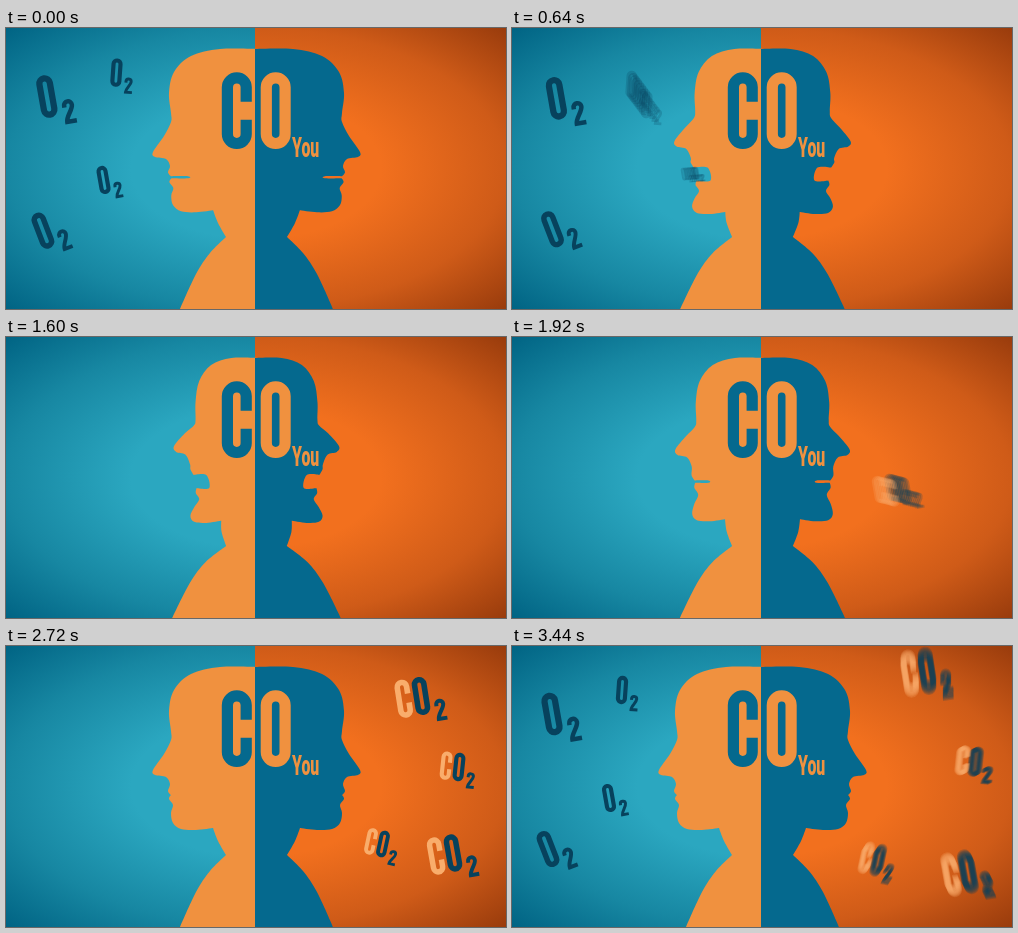
Recreate the animation shown at these times as an HTML page with a canvas. Size 500 px wide and 281 px high, loop 3520 ms.

```html
<!DOCTYPE html>
<html lang="en">
<head>
<meta charset="utf-8">
<title>CO You</title>
<style>
html, body { margin: 0; width: 100%; height: 100%; overflow: hidden; background: #0a7398; }
canvas { display: block; width: 100vw; height: 100vh; }
</style>
</head>
<body>
<canvas id="stage" width="500" height="281" role="img" aria-label="Two heads breathe in O2 and breathe out CO2"></canvas>
<script>
const LOOP = 3520, STEP = 80, SPLIT = 249, MIDDLE = 252;
const ORANGE = '#f0913f', BLUE = '#05698e', DARK = '#07425d', PEACH = '#f9ad6c';
const ctx = document.getElementById('stage').getContext('2d');
const clamp = (v, lo = 0, hi = 1) => Math.max(lo, Math.min(hi, v));
const mix = (a, b, k) => a + (b - a) * k;

// Smooth rise from 0 to 1 that starts at the given time.
function ramp(t, start, length) {
  const k = clamp((t - start) / length);
  return k * k * (3 - 2 * k);
}

// Resting profile from crown to shoulder; the mouth is a slit of no height.
const profile = '252,21 214,21 185,28 168,44 163,65 165,85 165,94 158,108 147,124 149,129 160,131 164,138 162,145 165,149 182,149 182,149 165,149 163,153 167,159 165,167 167,177 175,183 190,184 207,182 212,195 220,209 204,225 190,246 174,281'
  .split(' ').map(p => p.split(',').map(Number));
const corners = new Set([0, 13, 16, 23, 25, 28]);
const LIP = 12, JAW = 15, NECK = 24;

// Tilting back narrows the head and lifts the nose; opening parts the lips.
function bend(tilt, open) {
  return profile.map(([x, y], i) => {
    const nose = Math.exp(-(((y - 122) / 28) ** 2));
    const narrow = clamp((210 - y) * 0.006, -0.1, 0.3) - 0.1 * nose;
    let nx = MIDDLE - (MIDDLE - x) * (1 - narrow * tilt);
    let ny = y - 15 * nose * tilt;
    if (i >= LIP && i < JAW) ny -= 5 * open;
    if (i >= JAW && i < NECK) {
      const drop = clamp((185 - y) / 35, 0.25, 1) * open;
      nx += 3 * drop;
      ny += 8 * drop;
    }
    return [nx, ny];
  });
}

function head(pts, color, flip) {
  const tangent = i => corners.has(i) ? [0, 0]
    : [0, 1].map(j => (pts[i + 1][j] - pts[i - 1][j]) / 6);
  ctx.save();
  if (flip) {
    ctx.translate(501, 0);
    ctx.scale(-1, 1);
  }
  ctx.fillStyle = color;
  ctx.beginPath();
  ctx.moveTo(...pts[0]);
  for (let i = 1; i < pts.length; i++) {
    const [a, b] = [pts[i - 1], pts[i]];
    const [u, v] = [tangent(i - 1), tangent(i)];
    ctx.bezierCurveTo(a[0] + u[0], a[1] + u[1], b[0] - v[0], b[1] - v[1], ...b);
  }
  ctx.lineTo(MIDDLE, 281);
  ctx.fill();
  ctx.restore();
}

// One half of the wall, shaded towards the corners of the whole stage.
function wall(x, w, light, middle, dark) {
  ctx.save();
  ctx.beginPath();
  ctx.rect(x, 0, w, 281);
  ctx.clip();
  ctx.translate(250, 140.5);
  ctx.scale(250, 140.5);
  const g = ctx.createRadialGradient(0, 0, 0.5, 0, 0, 1.42);
  g.addColorStop(0, light);
  g.addColorStop(0.54, middle);
  g.addColorStop(1, dark);
  ctx.fillStyle = g;
  ctx.fillRect(-1, -1, 2, 2);
  ctx.restore();
}

// Narrow poster letters, 15 by 38 units around their centre.
const shapes = {
  O: new Path2D('M-4.7-11.7A4.7 4.7 0 0 1 4.7-11.7V11.7A4.7 4.7 0 0 1-4.7 11.7Z'),
  C: new Path2D('M4.7-4.5V-11.7A4.7 4.7 0 0 0-4.7-11.7V11.7A4.7 4.7 0 0 0 4.7 11.7V4.5'),
  2: new Path2D('M-3.5-4V-5.5A3.5 3.5 0 0 1 3.5-5.5C3.5-1-3.2 4-3.2 9H5.5')
};

function letter(name, x, y, scale, color, weight = 5.6) {
  ctx.save();
  ctx.translate(x, y);
  ctx.scale(scale, scale);
  ctx.strokeStyle = color;
  ctx.lineWidth = weight;
  ctx.stroke(shapes[name]);
  ctx.restore();
}

function molecule([x, y], size, turn, carbon) {
  ctx.save();
  ctx.translate(x, y);
  ctx.rotate(turn * Math.PI / 180);
  ctx.scale(size, size);
  if (carbon) letter('C', -17.5, 0, 1, PEACH);
  letter('O', 0, 0, 1, DARK);
  letter('2', 17.2, 16.5, 1, DARK, 4);
  ctx.restore();
}

// Draws a molecule, smeared along its way when it moves fast.
function smear(place, t, size, turn, carbon) {
  const [x0, y0] = place(t - 16), [x1, y1] = place(t + 16);
  if (Math.hypot(x1 - x0, y1 - y0) < 3) {
    molecule(place(t), size, turn, carbon);
    return;
  }
  ctx.globalAlpha = 0.22;
  for (let d = -16; d <= 16; d += 4) molecule(place(t + d), size, turn, carbon);
  ctx.globalAlpha = 1;
}

// Both lists are in the order of breathing.
const inhaled = [
  { x: 97, y: 152, size: 0.74, turn: -10 },
  { x: 110, y: 44, size: 0.74, turn: 4 },
  { x: 40, y: 68, size: 1.12, turn: -10 },
  { x: 36, y: 203, size: 0.98, turn: -21 }
];
const exhaled = [
  { x: 447, y: 207, size: 0.98, turn: -10 },
  { x: 415, y: 50, size: 1, turn: -9 },
  { x: 453, y: 121, size: 0.74, turn: 6 },
  { x: 377, y: 198, size: 0.7, turn: 12 }
];

// Drifts in from outside, hovers, then is drawn into the left mouth.
function inhale({ x, y, size, turn }, i, t) {
  const enter = 2760 + 60 * i, end = 4190 + 100 * i;
  if (t < enter || t >= end) return;
  const place = time => {
    const hover = 1.5 * (ramp(time, enter, 300) - 1) + 0.03 * clamp((time - 3440) / 400);
    const k = mix(hover, 1, ramp(time, end - 180, 180));
    return [mix(x, 186, k), mix(y, 145, k)];
  };
  smear(place, t, size * mix(1, 0.4, ramp(t, end - 160, 160)), turn, false);
}

// Blown out of the right mouth, hovers, then scatters away from the hub.
function exhale({ x, y, size, turn }, i, t) {
  const start = 1840 + 120 * i;
  if (t < start) return;
  const place = time => {
    const across = 1 - (1 - clamp((time - start) / 350)) ** 2;
    const away = 0.28 * Math.max(0, time - 3360) / STEP;
    return [mix(345, x, across) + (x - 415) * away,
      mix(147, y, ramp(time, start, 450)) + (y - 140) * away];
  };
  smear(place, t, size * mix(0.4, 1, ramp(t, start, 150)), turn, true);
}

function title() {
  letter('C', 230.8, 82.7, 2, BLUE);
  letter('O', 269.7, 82.7, 2, ORANGE);
  ctx.save();
  ctx.translate(286, 129);
  ctx.scale(0.555, 1);
  ctx.font = '900 28.5px Roboto, "Liberation Sans", sans-serif';
  ctx.fillStyle = ORANGE;
  ctx.fillText('You', 0, 0);
  ctx.restore();
}

function draw(t) {
  wall(0, SPLIT, '#2ba7c0', '#1787a2', '#006383');
  wall(SPLIT, 500 - SPLIT, '#f2701e', '#cf5b18', '#983b0c');
  const tilt = ramp(t, 0, 960) - ramp(t, 1680, 800);
  const open = t < 3400 ? ramp(t, -100, 400) - ramp(t, 1700, 300) : 0;
  const pts = bend(tilt, open);
  head(pts, ORANGE, false);
  head(pts, BLUE, true);
  title();
  const late = t < 1200 ? t + LOOP : t;
  inhaled.forEach((m, i) => inhale(m, i, late));
  exhaled.forEach((m, i) => exhale(m, i, t));
}

const begin = performance.now();
function tick() {
  const t = (performance.now() - begin) % LOOP;
  draw(Math.floor(t / STEP) * STEP);
  requestAnimationFrame(tick);
}
tick();
</script>
</body>
</html>
```
